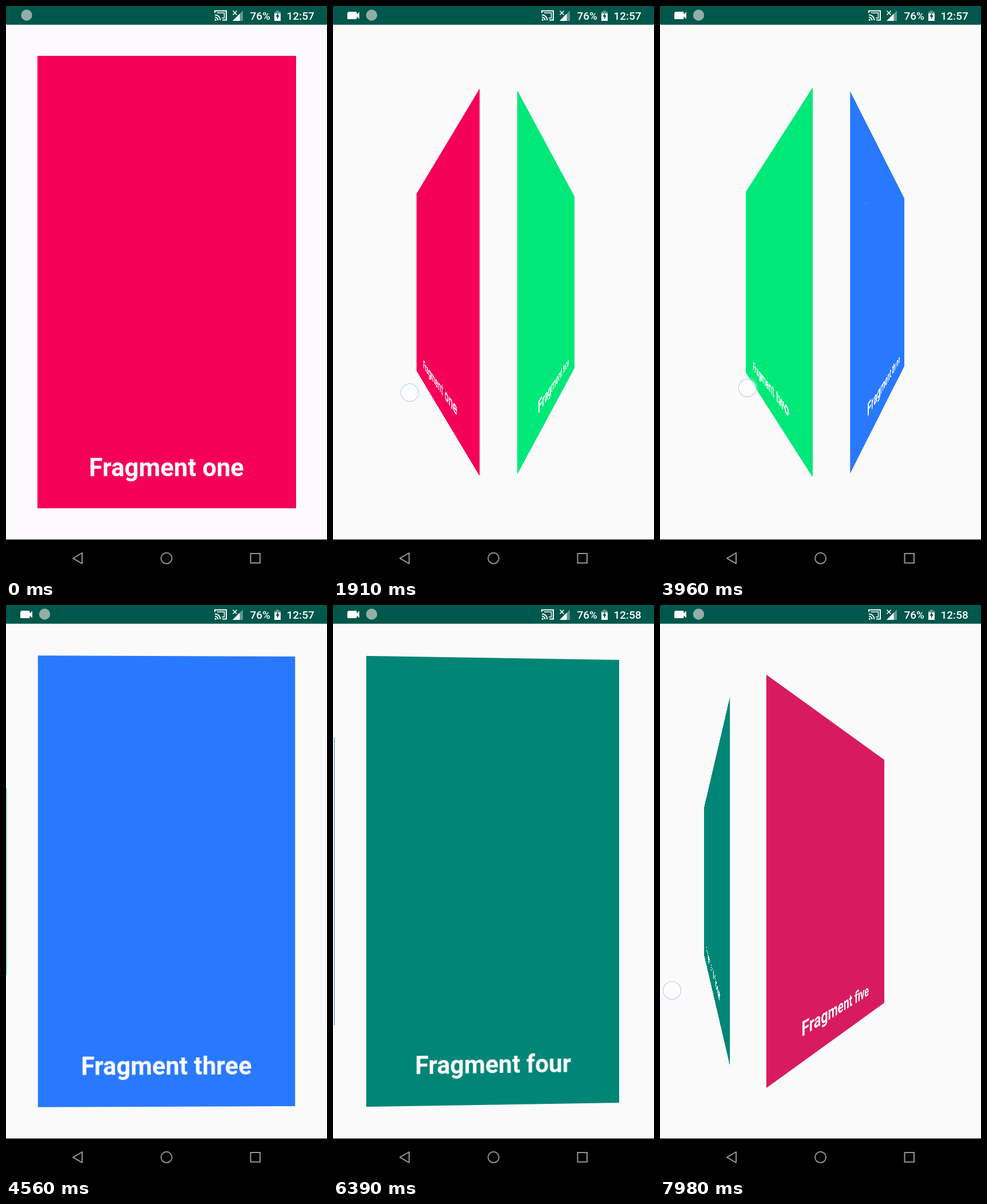
An HTML page for the animation above (8 s loop, 561 px wide and 997 px high).

```html
<!DOCTYPE html>
<html lang="en">
<head>
<meta charset="utf-8">
<title>Cube pager</title>
<style>
  html, body { margin: 0; width: 100%; height: 100%; overflow: hidden; background: #fafafa; }
  #stage { position: absolute; inset: 0; width: 561px; height: 997px; overflow: hidden; background: #fafafa; }
  .page { position: absolute; left: 0; top: 32.7px; width: 561px; height: 898.8px; }
  .card { position: absolute; inset: 54.5px; }
  .card span {
    position: absolute; left: 0; right: 0; bottom: 45px; text-align: center;
    font: 700 43.6px/51px Roboto, sans-serif; color: #fff; white-space: nowrap;
  }
  svg { position: absolute; left: 0; top: 0; }
  svg text { font: 500 19px Roboto, sans-serif; fill: #fff; }
  #touch {
    position: absolute; left: -16px; top: -16px; width: 30px; height: 30px; border-radius: 50%;
    border: 1px solid rgba(110, 140, 205, .5); background: rgba(255, 255, 255, .66);
    box-shadow: 0 0 4px 2px rgba(255, 255, 255, .32);
  }
</style>
</head>
<body>
<div id="stage">
  <div id="pages"></div>
  <svg width="561" height="997" viewBox="0 0 561 997">
    <rect width="561" height="32.7" fill="#00574b"/>
    <path id="camera" fill="#fff" d="M26.5 10H40q1.500 0 1.500 1.500v3l4.500-4v12l-4.500-4v3q0 1.500-1.500 1.500H26.500q-1.500 0-1.500-1.500v-9q0-1.500 1.500-1.500z"/>
    <circle id="badge" cx="67.500" cy="16" r="9.700" fill="#92aea7"/>
    <g fill="none" stroke="#fff" stroke-width="2">
      <path d="M365 12V8.500H385V24.500H378M365 15.500A9.500 9.500 0 0 1 374.500 25M365 19.500A5.500 5.500 0 0 1 370.500 25"/>
      <path d="M368.500 12H381.500V21H377" stroke-width="1.500"/>
    </g>
    <path d="M365 22.500a3 3 0 0 1 3 3h-3z" fill="#fff"/>
    <path d="M396 26L414 8V26z" fill="#fff" opacity=".38"/>
    <path d="M396 26L408.500 13.500V26z" fill="#fff"/>
    <path d="M396.500 8.500l7 7m0-7l-7 7" stroke="#fff" stroke-width="1.600"/>
    <text x="426.500" y="23.500">76%</text>
    <path d="M469 10h3.500V8h4v2H480v4H469z" fill="#fff" opacity=".4"/>
    <path d="M469 13h11v13h-11z" fill="#fff"/>
    <path d="M475.500 11.500L471.500 18.500h2.300v5l4-7h-2.300z" fill="#00574b"/>
    <text id="clock" x="490.500" y="23.500">12:57</text>
    <rect y="931.500" width="561" height="65.500"/>
    <g fill="none" stroke="#969696" stroke-width="2">
      <path d="M117 964.300L133 955V973.600z" stroke-linejoin="round"/>
      <circle cx="280.500" cy="964.300" r="9.500"/>
      <rect x="427.500" y="956" width="16.500" height="16.500"/>
    </g>
  </svg>
  <div id="touch"></div>
</div>
<script>
const LOOP = 8000, W = 561, DEPTH = 224.6, SETTLE = 600;
const $ = id => document.getElementById(id);

const cards = [
  ['one', '#f50057'], ['two', '#00e978'], ['three', '#2979ff'],
  ['four', '#008577'], ['five', '#d81b60']
];

// Finger paths as [ms, x, y]; slop is the travel before the page follows.
const swipes = [
  { slop: 22, path: [[200, 427, 650], [500, 400, 652], [1910, 134, 675], [2060, 95, 682]] },
  { slop: 39.5, path: [[2910, 452, 640], [3020, 452, 640], [3060, 372, 645], [3960, 153, 667], [4150, 100, 672]] },
  { slop: 22, path: [[4800, 425, 560], [4860, 395, 564], [5390, 302, 578], [6040, 100, 592]] },
  { slop: 25, path: [[6820, 419, 593], [6940, 419, 593], [6980, 350, 600], [7780, 136, 655], [7880, 58, 668], [7945, 21, 673]] }
];

const ticks = [0, 810, 2910, 3060, 5190, 6820, 6980];

const pages = cards.map(([word, color]) => {
  const page = document.createElement('div');
  page.className = 'page';
  page.innerHTML = `<div class="card" style="background:${color}"><span>Fragment ${word}</span></div>`;
  $('pages').append(page);
  return page;
});

function snap(t) {
  const start = ticks.filter(k => k <= t).pop();
  return start + Math.floor((t - start) / 100) * 100;
}

function along(path, t) {
  const i = path.findIndex(p => p[0] > t);
  if (i < 0) return path[path.length - 1].slice(1);
  if (i === 0) return path[0].slice(1);
  const a = path[i - 1], b = path[i], k = (t - a[0]) / (b[0] - a[0]);
  return [a[1] + (b[1] - a[1]) * k, a[2] + (b[2] - a[2]) * k];
}

function progress({ slop, path }, t) {
  const up = path[path.length - 1][0];
  const drag = Math.max(0, path[0][1] - along(path, t)[0] - slop) / W;
  if (t <= up) return drag;
  const k = Math.min(1, (t - up) / SETTLE);
  return 1 - (1 - drag) * (1 - k) ** 5;
}

function placePage(page, pos) {
  const shown = Math.abs(pos) < 1;
  page.style.display = shown ? '' : 'none';
  if (!shown) return;
  page.style.transformOrigin = pos < 0 ? '100% 50%' : '0 50%';
  page.style.transform = pos === 0 ? 'none'
    : `translateX(${pos * W}px) perspective(${DEPTH}px) rotateY(${pos * 90}deg)`;
}

function draw(t) {
  const scroll = swipes.reduce((sum, s) => sum + progress(s, t), 0);
  pages.forEach((page, i) => placePage(page, i - scroll));

  const held = swipes.find(({ path }) => t >= path[0][0] && t <= path[path.length - 1][0] + 40);
  $('touch').style.display = held ? '' : 'none';
  if (held) {
    const [x, y] = along(held.path, t);
    $('touch').style.transform = `translate(${x}px, ${y}px)`;
  }

  const recording = t >= 100;
  $('camera').style.display = recording ? '' : 'none';
  $('badge').setAttribute('cx', recording ? 67.5 : 36);
  $('stage').style.background = recording ? '#fafafa' : '#fcfafd';
  $('clock').textContent = t < 4700 ? '12:57' : '12:58';
}

const begin = performance.now();
function frame() {
  draw(snap((performance.now() - begin) % LOOP));
  requestAnimationFrame(frame);
}
frame();
</script>
</body>
</html>
```
